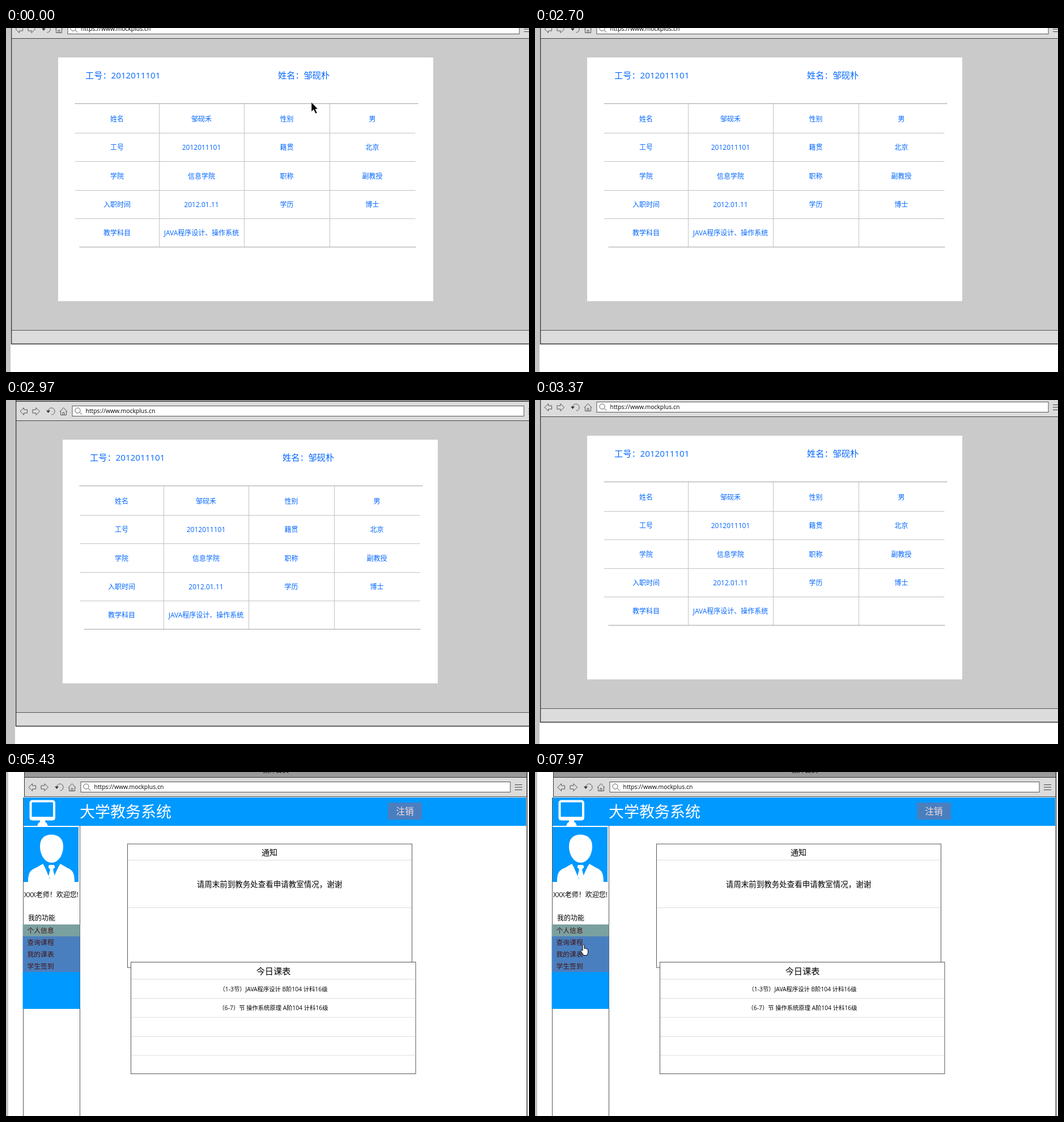
Write an HTML page that moves like this. It is 923x607 px and loops after 8000 ms.

```html
<!DOCTYPE html>
<html lang="zh-CN">
<head>
<meta charset="utf-8">
<title>教务系统</title>
<style>
html, body { margin: 0; width: 100%; height: 100%; overflow: hidden; background: #fff; }
svg { display: block; width: 100%; height: 100%; }
text { font-family: "Open Sans", "Noto Sans CJK SC", "Noto Sans CJK", "Noto Sans CJK JP", sans-serif; white-space: pre; }
</style>
</head>
<body>
<svg viewBox="0 0 923 607" preserveAspectRatio="none">
  <g id="info"></g>
  <g id="home"></g>
  <path id="arrow" d="M0 0V16.5L4 13L7.2 20L10 18.8L6.8 12H11.3Z" stroke="#fff" stroke-width=".5"/>
  <path id="hand" fill="#fff" stroke="#000" stroke-linejoin="round"
    d="M4 11.5V2.2C4 .2 7 .2 7 2.2V7.5C8 6.6 9.3 6.9 9.5 8C10.5 7.4 11.5 7.8 11.8 8.8C12.8 8.4 13.5 9 13.5 10V14C13.5 16 12.3 17 12.1 19.5H5.5C5 17 2.4 14.6 .8 11.8C.3 10.2 2 9.4 4 11.5Z"/>
</svg>
<script>
const $ = id => document.getElementById(id);

const rect = (x, y, w, h, fill, stroke = 'none') =>
  `<rect x="${x}" y="${y}" width="${w}" height="${h}" fill="${fill}" stroke="${stroke}"/>`;
const line = (x1, y1, x2, y2, color, extra = '') =>
  `<path d="M${x1} ${y1}L${x2} ${y2}" stroke="${color}" fill="none" ${extra}/>`;
// y is the vertical middle of the glyphs
const text = (s, x, y, size, color, anchor = 'start') =>
  `<text x="${x}" y="${(y + size * .37).toFixed(2)}" font-size="${size}" fill="${color}" text-anchor="${anchor}">${s}</text>`;

// Browser toolbar; the origin is its bottom left corner
function toolbar(x, y, w) {
  const right = 99 + w, icon = 'fill="none" stroke="#555"';
  return `<g transform="translate(${x} ${y})">` +
    rect(0, -60, right + 30, 26, '#999') +
    rect(0, -34, right + 30, 34, '#dcdcdc') +
    line(0, -34, right + 30, -34, '#333') +
    line(0, 0, right + 30, 0, '#444') +
    `<g ${icon}>
      <path d="M7.5 -16.5L14 -23V-19.5H20V-13.5H14V-10Z"/>
      <path d="M42 -16.5L35.5 -23V-19.5H29.5V-13.5H35.5V-10Z"/>
      <path d="M57 -17C58 -25 69 -24 68.5 -16C68.3 -12.5 66 -11 63 -10.5"/>
      <path d="M53.5 -18H60.5L57 -13.5Z" fill="#333" stroke="none"/>
      <path d="M77.5 -16L84 -23L90.5 -16M79 -17.5V-10H89V-17.5M82.5 -10V-14.5H85.5V-10"/>
    </g>` +
    rect(99.5, -26, w, 18, '#fff', '#555') +
    `<path d="M112.6 -14.6L117 -10.5" ${icon}/><circle cx="109" cy="-18" r="4.6" ${icon}/>` +
    text('https://www.mockplus.cn', 123, -17.5, 10.4, '#000') +
    [-21, -16.5, -12].map(v => line(right + 8.5, v, right + 21.5, v, '#444')).join('') +
    '</g>';
}

function infoPage() {
  const blue = '#06f', grey = '#c2c2c2';
  const cols = [196, 345, 495.5, 646.5];
  const rows = [
    ['姓名', '邹砚禾', '性别', '男'],
    ['工号', '2012011101', '籍贯', '北京'],
    ['学院', '信息学院', '职称', '副教授'],
    ['入职时间', '2012.01.11', '学历', '博士'],
    ['教学科目', 'JAVA程序设计、操作系统']
  ];
  const dots = 'stroke-dasharray="1 1"';
  let s = rect(-40, -60, 48, 720, '#c5c5c5') +
    rect(10, 18.5, 925, 515, '#cacaca') +
    rect(10, 533.5, 925, 24, '#dcdcdc') +
    toolbar(9.5, 18.5, 797) +
    line(9.5, 533.5, 935, 533.5, '#555') +
    line(923, 556, 931, 548, '#555') +
    line(9.5, -60, 9.5, 558, '#333', 'stroke-width="1.5"') +
    line(9, 557.5, 935, 557.5, '#333', 'stroke-width="1.5"') +
    rect(92, 52, 662, 430, '#fff') +
    text('工号：2012011101', 140, 83.5, 15.2, blue) +
    text('姓名：邹砚朴', 480, 83.5, 15.2, blue);
  rows.forEach((row, r) => {
    const y = 160.7 + r * 50.25;
    row.forEach((cell, c) => s += text(cell, cols[c], y, 12, blue, 'middle'));
    if (r) s += line(122, Math.floor(135.3 + r * 50.3) + .5, 722.5, Math.floor(135.3 + r * 50.3) + .5, grey);
  });
  for (const x of [270.5, 420.5, 571.5]) s += line(x, 134, x, 386, grey);
  return s + line(122, 133.5, 727, 133.5, '#444', dots) +
    line(130, 386.5, 724, 386.5, '#444', dots);
}

function homePage() {
  const blue = '#09f', ink = '#000', pale = '#ddd', edge = '#555', maroon = '#421414';
  let s = rect(0, 0, 923, 607, '#fff') + rect(0, 0, 4, 607, '#c5c5c5') +
    toolbar(32.5, 43.5, 758) +
    text('教师首页', 476, -3.5, 11.8, ink, 'middle') +
    line(32.5, 0, 32.5, 44, '#333') +
    line(919.5, 0, 919.5, 607, '#333', 'stroke-width="1.5"') +
    rect(31, 45, 887, 50, blue) +
    line(30.5, 45, 30.5, 607, edge) + line(130.5, 95, 130.5, 607, edge);
  // Monitor
  s += '<rect x="43.5" y="51.5" width="41.5" height="32" rx="3" fill="none" stroke="#fff" stroke-width="4"/>' +
    rect(43, 79, 42.5, 6, '#fff') +
    '<path d="M60 85H69V88Q73 90 73.5 95H55.500Q56 90 60 88Z" fill="#fff"/>';
  s += text('大学教务系统', 130, 70, 27, '#fff') +
    rect(674, 54, 60, 30, '#4a7fbf') +
    text('注销', 704, 69, 15.5, '#fdd', 'middle');
  // Avatar
  s += rect(31, 97, 97, 97, blue) +
    '<path d="M80 110.500C93 110.500 101 118 101 131C101 147 92 160 80.500 160C69 160 60 147 60 131C60 118 67 110.500 80 110.500Z" fill="#fff"/>' +
    '<path d="M39 194C39 177 43 173 53 169L65 162L80 185L96 162L108 169C117 173 121 177 121 194Z" fill="#fff"/>' +
    `<path d="M66 162H95L83 188H77Z" fill="${blue}"/>` +
    '<path d="M76 164H85L86.500 168L83 172L86 184L80.500 191L75 184L78 172L74.500 168Z" fill="#fff"/>';
  s += text('XXX老师！欢迎您!', 32, 217, 12, ink) +
    text('我的功能', 39, 257.5, 12, ink) +
    rect(29.5, 269, 101, 21, '#7ba0a0') +
    rect(29.5, 290, 101, 63, '#4a7fbf') +
    rect(29.5, 353, 101, 65, blue);
  ['个人信息', '查询课程', '我的课表', '学生签到'].forEach((v, i) =>
    s += text(v, 37.5, 280 + 21 * i, 11.8, maroon));
  // Notices
  s += rect(214.5, 127, 502, 218, '#fff', edge) +
    line(215, 155.5, 716, 155.5, pale) + line(215, 239.5, 716, 239.5, pale) +
    text('通知', 465, 141.5, 14, ink, 'middle') +
    text('请周末前到教务处查看申请教室情况，谢谢', 465, 197.5, 13.5, ink, 'middle');
  // Timetable
  s += rect(220.5, 335.5, 502.5, 197, '#fff', edge) +
    text('今日课表', 472, 351, 15.2, ink, 'middle') +
    text('（1-3节）JAVA程序设计 B阶104 计科16级', 472, 383, 10.3, ink, 'middle') +
    text('（6-7）节 操作系统原理 A阶104 计科16级', 472, 416.5, 10.3, ink, 'middle');
  for (const y of [365.5, 399.5, 433, 466.5, 500]) s += line(221, y, 722.5, y, pale);
  return s;
}

$('info').innerHTML = infoPage();
$('home').innerHTML = homePage();

const LOOP = 8000, SWITCH = 5430;
// Bursts of movement: start, step length, number of steps
const bursts = [
  [0, 1, 1], [150, 141.4, 8], [1260, 132, 6], [2190, 130, 7], [3250, 137.1, 8],
  [4340, 1, 1], [5430, 161.7, 7], [6550, 138.6, 8], [7670, 150, 3]
];
const pan = [[2710, 0, 0], [2840, 4, 9], [2970, 8, 18], [3250, 5, 15], [3524, -4, 8]];
const path = [
  [0, 539, 131], [290, 480, 118], [574, 342, 124], [857, 450, 116], [1140, 565, 138],
  [1260, 582, 143], [1392, 536, 151], [1656, 414, 388], [1920, 536, 380],
  [2190, 577, 300], [2450, 800, 85], [2580, 905, 22], [2710, 960, -40],
  [2711, -60, 120], [3524, -60, 120], [3661, 20, 112], [3935, 190, 92], [4210, 262, 80],
  [4340, -60, 90], [5754, -60, 200], [5915, 10, 222], [6400, 80, 262],
  [6550, 79, 264], [6830, 84, 278], [7100, 88, 299], [7520, 79, 257],
  [7670, 80, 270], [7820, 84, 292], [7970, 85.5, 304]
];

function snap(t) {
  const [start, step, n] = bursts.filter(b => b[0] <= t).pop();
  return start + step * Math.min(n - 1, Math.floor((t - start) / step + .15));
}

function at(keys, t) {
  const i = keys.findIndex(k => k[0] > t);
  if (i < 0) return keys[keys.length - 1].slice(1);
  if (!i) return keys[0].slice(1);
  const a = keys[i - 1], b = keys[i], f = (t - a[0]) / (b[0] - a[0]);
  return [1, 2].map(k => a[k] + (b[k] - a[k]) * f);
}

const move = (el, x, y) => el.setAttribute('transform', `translate(${x} ${y})`);
const show = (el, on) => el.setAttribute('display', on ? 'inline' : 'none');

function draw(time) {
  const t = snap(time), isHome = time >= SWITCH;
  const [px, py] = at(pan, t).map(Math.round);
  const [x, y] = at(path, t);
  const overMenu = isHome && x > 30 && y > 268;
  show($('info'), !isHome);
  show($('home'), isHome);
  move($('info'), px, py);
  show($('arrow'), !overMenu);
  show($('hand'), overMenu);
  move($('arrow'), x, y);
  move($('hand'), x - 5.5, y);
}

const began = performance.now();
function tick() {
  draw((performance.now() - began) % LOOP);
  requestAnimationFrame(tick);
}
tick();
</script>
</body>
</html>
```
